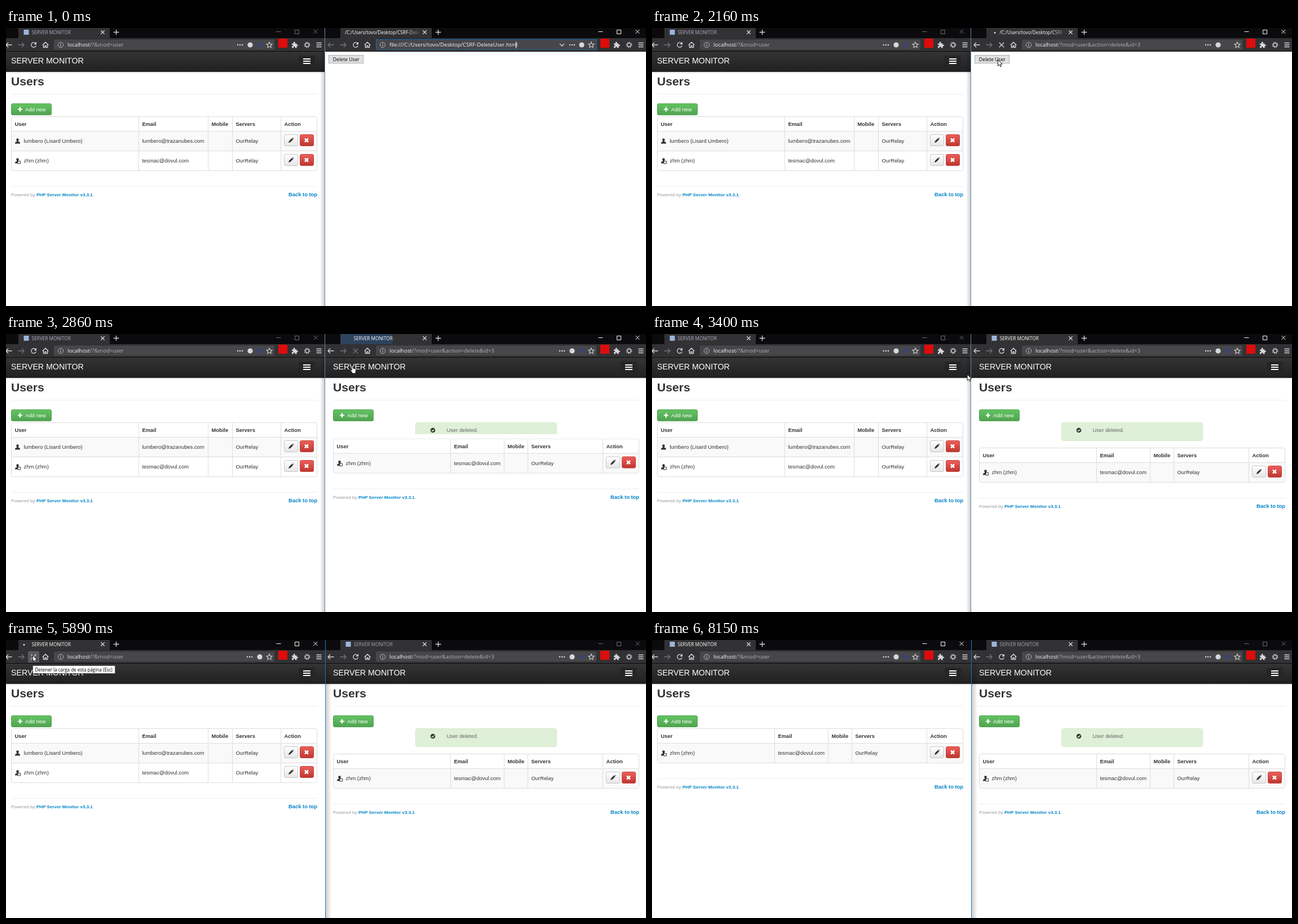
An HTML page that plays this animation: 1135x494 px, repeating every 8700 ms.

```html
<!DOCTYPE html>
<html lang="en">
<head>
<meta charset="utf-8">
<title>Server monitor demo</title>
<style>
html, body { margin: 0; width: 100%; height: 100%; overflow: hidden; background: #fff; }
svg { display: block; width: 1135px; height: 494px; }
text { font: 9.4px "Liberation Sans", Arial, sans-serif; fill: #333; white-space: pre; }
text.b { font-weight: bold; }
text.h { font-size: 21.1px; font-weight: bold; }
text.brand { font-size: 14.2px; fill: #fff; }
text.small { font-size: 8.04px; fill: #999; }
text.link { font-weight: bold; fill: #0084c8; }
text.white { fill: #fff; }
text.url { font: 9.5px "Open Sans", "Noto Sans", sans-serif; fill: #f9f9fa; }
text.tab { font: 8.25px "Open Sans", "Noto Sans", sans-serif; fill: currentColor; }
text.btn { font: 8.6px "Open Sans", "Noto Sans", sans-serif; fill: #000; text-anchor: middle; }
text.tip { font: 8.05px "Open Sans", "Noto Sans", sans-serif; fill: #000; }
tspan.dim { fill: #b1b1b3; }
.ln { fill: none; stroke: currentColor; stroke-width: 1.3; }
.fl { fill: currentColor; }
.t { animation: 8.7s step-end infinite; }
.move { animation: 8.7s linear infinite; }
.burst { transform-box: fill-box; transform-origin: 0 0; }
.dot { animation: wait .87s -.2s ease-in-out infinite; }
@keyframes wait { 50% { transform: translateX(8px); } }
</style>
</head>
<body>
<svg id="stage" viewBox="0 0 1135 494"></svg>
<script>
const LOOP = 8700, RIGHT = 571;
let css = '', count = 0;

const pct = ms => (ms / LOOP * 100).toFixed(3) + '%';
const keys = (name, steps) =>
  css += `@keyframes ${name}{${steps.map(([ms, rule]) => `${pct(ms)}{${rule}}`).join('')}}\n`;

// Shows the markup between pairs of times: on, off, on, off ...
function on(times, markup) {
  const name = 'on' + count++;
  keys(name, [[0, 'opacity:0'], ...times.map((ms, i) => [ms, `opacity:${1 - i % 2}`])]);
  return `<g class="t" style="animation-name:${name}">${markup}</g>`;
}
const after = (ms, markup) => on([ms, LOOP], markup);
const until = (ms, markup) => on([0, ms], markup);

const at = (x, y, markup, color = '#d7d7db') =>
  `<g transform="translate(${x} ${y})" color="${color}">${markup}</g>`;
const text = (x, y, s, cls = '') => `<text x="${x}" y="${y}" class="${cls}">${s}</text>`;
const rect = (x, y, w, h, fill, more = '') =>
  `<rect x="${x}" y="${y}" width="${w}" height="${h}" fill="${fill}" ${more}/>`;
const line = (d, more = '') => `<path class="ln" d="${d}" ${more}/>`;
const solid = (d, more = '') => `<path class="fl" d="${d}" ${more}/>`;
const disc = (x, y, r) => `<circle class="fl" cx="${x}" cy="${y}" r="${r}"/>`;
const grad = (id, a, b, dir = 'x2="0" y2="1"') =>
  `<linearGradient id="${id}" ${dir}><stop stop-color="${a}"/><stop offset="1" stop-color="${b}"/></linearGradient>`;

const person = '<circle class="fl" cy="-2.4" r="2.3"/>' + solid('M-4.5 4.5V3Q-4 1.4-1.4.8V-1H1.4V.8Q4 1.4 4.5 3V4.5Z');
const icon = {
  back: line('M5.5 0H-5M-1-4.2L-5 0L-1 4.2'),
  fwd: line('M-5.5 0H5M1-4.2L5 0L1 4.2'),
  reload: line('M3.3-2.9A4.3 4.3 0 1 0 4.2 1.2') + solid('M5-5.4V-.8H.4Z'),
  stop: line('M-4.3-4.3L4.3 4.3M4.3-4.3L-4.3 4.3'),
  home: line('M-5.3.3L0-4.8L5.3.3M-3.6-.8V4.5H-1V1.5H1V4.5H3.6V-.8'),
  info: '<circle class="ln" r="4.6" style="stroke-width:1"/>' + solid('M-.6-.7H.6V2.6H-.6ZM-.6-2.7H.6V-1.5H-.6Z'),
  dots: disc(-4, 0, 1.25) + disc(0, 0, 1.25) + disc(4, 0, 1.25),
  ball: disc(0, 0, 4.6),
  chevron: line('M-4-2L0 2L4-2'),
  star: line('M0-5L1.5-1.8L5-1.4L2.4 1L3.1 4.5L0 2.8L-3.1 4.5L-2.4 1L-5-1.4L-1.5-1.8Z', 'style="stroke-width:1.1"'),
  puzzle: solid('M-5-2.5H-2Q-3-5.5-.8-5.5T.5-2.5H3.6V0Q6 -1 6 1T3.6 2V5.5H.8Q1 3-.8 3T-2.2 5.5H-5V2Q-2.8 2.5-2.8 1T-5 .2Z'),
  gear: '<circle class="ln" r="3.1"/><circle class="ln" r="4.7" stroke-dasharray="1.8 1.89"/>',
  menu: line('M-4.5-3.5H4.5M-4.5 0H4.5M-4.5 3.5H4.5'),
  plus: line('M-4.8 0H4.8M0-4.8V4.8'),
  pencil: solid('M-4.5 4.5L-3.6 1.4L1.6-3.8L3.8-1.6L-1.4 3.6ZM2.3-4.4L3-5L5-3L4.4-2.3Z'),
  cross: line('M-3-3L3 3M3-3L-3 3', 'style="stroke-width:2.5"'),
  check: disc(0, 0, 4.3) + '<path d="M-2.2 0L-.6 1.7L2.4-1.5" fill="none" stroke="#dff0d8" stroke-width="1.5"/>',
  admin: person,
  guest: person + '<path d="M.5.5H5V5H.5Z" fill="#fff" stroke="#333"/>'
};

// Browser window parts shared by both sides.
const chrome = () =>
  rect(-5, 0, 571, 42, '#0b0b0d') + rect(22, 0, 162, 19, '#323234') + rect(-5, 18, 571, 23, '#323234') +
  rect(85, 20.5, 391, 18, '#474749', 'rx="1"') +
  at(27, 30, icon.fwd, '#737375') + at(70, 30, icon.home) + at(97, 30, icon.info, '#b5b5b8') +
  at(467, 30, icon.star) + rect(483, 19, 16, 16, '#e00b0b') + at(512, 30, icon.puzzle) +
  at(534, 30, icon.gear) + at(555, 30, icon.menu) +
  at(171.5, 7.5, line('M-3.2-3.2L3.2 3.2M3.2-3.2L-3.2 3.2')) + at(195.5, 7.5, icon.plus);

const controls = line('M479.5 6.5H487.5M512.5 3.5H519.5V10.5H512.5ZM545.5 3L552.5 10M552.5 3L545.5 10', 'style="stroke-width:1"');
const favicon = rect(31.5, 3, 9, 9, '#9db4dc');
const siteTitle = text(45.5, 11, 'SERVER MONITOR', 'tab');
const dot = '<circle class="dot" cx="32" cy="8.5" r="1.5" fill="#ddd"/>';
const pageIcons = at(415, 30, icon.dots) + at(433, 30, icon.ball);
const siteMark = at(450, 30, icon.ball, '#3d4273');
const localUrl = rest => text(109, 33.4, `localhost<tspan class="dim">${rest}</tspan>`, 'url');

function burst(start) {
  const name = 'burst' + start;
  keys(name, [[0, 'transform:scaleX(0);opacity:0'], [start, 'transform:scaleX(.06);opacity:0'],
    [start + 1, 'transform:scaleX(.06);opacity:.85'], [start + 375, 'transform:scaleX(1);opacity:0'],
    [LOOP, 'transform:scaleX(0);opacity:0']]);
  return `<g class="move burst" style="animation-name:${name}">${rect(22, 0, 162, 18, '#285f9f')}</g>`;
}

// Text colour that follows the focused window.
function focus(name, first, then, markup) {
  keys(name, [[0, `color:${first}`], [4890, `color:${then}`]]);
  return `<g class="t" style="animation-name:${name}">${markup}</g>`;
}

const button = (x, y, w, fill, edge) => rect(x + .5, y + .5, w - 1, 20, `url(#${fill})`, `rx="2.5" stroke="${edge}"`);

const header = () =>
  rect(-5, 42, 571, 452, '#fff') + rect(-5, 78, 571, 3, 'url(#under)') + rect(-5, 42, 571, 36, 'url(#nav)') +
  text(9, 63, 'SERVER MONITOR', 'brand') + rect(519, 49, 29, 19, '#252525', 'rx="3"') +
  [54, 58, 62].map(y => rect(527, y, 13, 2, '#fff')).join('') +
  text(9, 102, 'Users', 'h') + rect(9, 117, 543, 1, '#eee') +
  button(9, 134, 72, 'green', '#51a351') + at(25, 144.5, line('M-4 0H4M0-4V4', 'style="stroke-width:2.2"'), '#fff') +
  text(34, 148, 'Add new', 'white');

function table(cols, rows) {
  const [email, mobile, servers, action] = cols, n = rows.length, end = 183 + 35 * n, hr = 211 + 35 * n;
  const heads = [[15.5, 'User'], [email + 6.5, 'Email'], [mobile + 6.5, 'Mobile'], [servers + 6.5, 'Servers'], [action + 6.5, 'Action']];
  return rect(9.5, 157.5, 542, end - 157, '#fff', 'rx="3"') + rect(10, 183, 541, 35, '#f9f9f9') +
    rows.map(([kind, name, mail], i) => {
      const y = 183 + 35 * i;
      return rect(10, y, 541, 1, '#ddd') + at(20.5, y + 18, icon[kind], '#333') +
        text(31.5, y + 21, name) + text(email + 6.5, y + 21, mail) + text(servers + 6.5, y + 21, 'OurRelay') +
        button(493, y + 6, 25, 'plain', '#c8c8c8') + at(505.5, y + 16.5, icon.pencil, '#333') +
        button(521, y + 6, 25, 'red', '#c5443f') + at(533, y + 16.5, icon.cross, '#fff');
    }).join('') +
    cols.map(x => rect(x, 158, 1, end - 158, '#ddd')).join('') +
    rect(9.5, 157.5, 542, end - 157, 'none', 'rx="3" stroke="#ddd"') +
    heads.map(([x, s]) => text(x, 174.4, s, 'b')).join('') +
    rect(9, hr, 543, 1, '#eee') + text(9, hr + 18, 'Powered by', 'small') +
    `<text x="54" y="${hr + 18}" class="small"><tspan fill="#0084c8" font-weight="bold">PHP Server Monitor v3.3.1</tspan>.</text>` +
    text(501, hr + 18, 'Back to top', 'link');
}

const admin = ['admin', 'lumbero (Lisard Umbero)', 'lumbero@trazanubes.com'];
const guest = ['guest', 'zhm (zhm)', 'tesmac@dovul.com'];
const short = () => table([217, 312, 354, 487], [guest]);

function slide(name, from, to, markup) {
  const ease = 'animation-timing-function:cubic-bezier(.364,0,.636,1)';
  keys(name, [[0, from], [2626, `${from};${ease}`], [3026, to], [LOOP, to]]);
  return `<g class="move" style="animation-name:${name}">${markup}</g>`;
}

const leftSide = () =>
  header() + until(6050, table([235, 358, 401, 487], [admin, guest])) + after(6050, short()) +
  chrome() + burst(6050) +
  on([4340, 6730], rect(39, 20, 20, 20, '#5b5b5d', 'rx="2"')) +
  at(5, 30, icon.back) +
  on([0, 4990, 6600, LOOP], at(49, 30, icon.reload)) + on([4990, 6600], at(49, 30, icon.stop)) +
  localUrl('/?&amp;mod=user') +
  on([0, 5050, 6250, LOOP], pageIcons + siteMark) +
  on([5050, 6250], at(432, 30, icon.dots) + at(450, 30, icon.ball)) +
  on([0, 4990, 6400, LOOP], favicon) + on([4990, 6050], dot) +
  focus('leftTitle', '#b5a9c4', '#fff', siteTitle) + focus('leftCtl', '#6f6f72', '#fff', controls);

const deletePage = () =>
  rect(-5, 42, 571, 452, '#fff') +
  on([0, 1300, 1780, LOOP], rect(1.5, 48.5, 61, 14, '#e1e1e1', 'stroke="#adadad"')) +
  on([1300, 1780], rect(1.5, 48.5, 61, 14, '#e5f1fb', 'stroke="#0078d7"')) +
  on([1530, 1620], rect(1.5, 48.5, 61, 14, '#cce4f7', 'stroke="#005499"')) +
  text(32.3, 58.8, 'Delete User', 'btn');

const alertBox = () =>
  rect(155.5, 157.5, 250, 32, '#dff0d8', 'rx="3" stroke="#d6e9c6"') + at(186, 171, icon.check, '#333') +
  `<text x="210.5" y="174.4" style="fill:#666">User deleted.</text>`;

const rightSide = () =>
  until(2480, deletePage()) +
  after(2480, header() +
    slide('push', 'transform:translateY(0)', 'transform:translateY(45px)', short()) +
    slide('open', 'clip-path:inset(0 0 100% 0)', 'clip-path:inset(0 0 0 0)', alertBox())) +
  chrome() + burst(2660) +
  until(2150, at(5, 30, icon.back, '#737375')) + after(2150, at(5, 30, icon.back)) +
  on([0, 1930, 3100, LOOP], at(49, 30, icon.reload)) +
  on([1930, 2480], at(49, 30, icon.stop)) + on([2480, 3100], at(49, 30, icon.stop, '#77777a')) +
  until(1780, rect(85.5, 20.5, 391, 18, 'none', 'stroke="#176aa8"') +
    at(415, 30, icon.chevron) + at(433, 30, icon.dots) + at(450, 30, icon.ball)) +
  after(1780, pageIcons) + after(2480, siteMark) +
  until(2150, text(109, 33.4, 'file:///C:/Users/tovo/Desktop/CSRF-DeleteUser.html', 'url')) +
  after(2150, localUrl('/?mod=user&amp;action=delete&amp;id=3')) +
  on([0, 70, 580, 1070], rect(333, 24, 1, 12, '#fff')) +
  focus('rightTitle', '#fff', '#a5a5aa',
    until(1780, text(30, 11, '/C:/Users/tovo/Desktop/CSRF-Dele', 'tab')) +
    on([1780, 2480], text(45.5, 11, '/C:/Users/tovo/Desktop/CSRF', 'tab')) +
    until(2480, rect(140, 1, 24, 16, 'url(#fade)')) + after(2480, siteTitle)) +
  on([1780, 2600], dot) + after(3000, favicon) +
  focus('rightCtl', '#fff', '#6f6f72', controls);

const arrow = '<path d="M.5.5V11.2L3 8.9L4.8 12.8L6.6 12L4.9 8.2H8.2Z" fill="#fff" stroke="#000" stroke-width=".9"/>';
const hand = '<path d="M-1.2 1Q0-.6 1.2 1V5L5 6Q6.4 6.4 6.2 8L5.4 12V14H-.6V12.5L-4 8Q-3.5 6.5-1.2 8.4Z" fill="#fff" stroke="#000" stroke-width=".8"/>';

const stops = [
  [0, 1010, 520], [229, 1010, 520], [230, 1010, 461], [650, 850, 270], [1070, 628, 67], [1300, 613, 56],
  [3250, 613, 56], [3400, 560, 71], [3460, 480, 90], [3550, 366, 108], [3710, 366, 108], [4000, 225, 73],
  [4340, 47, 27], [6670, 47, 27], [7100, 480, 235], [7530, 977, 457], [8150, 1062, 497], [LOOP, 1062, 520]
];
keys('cursor', stops.map(([ms, x, y]) => [ms, `transform:translate(${x}px,${y}px)`]));

document.getElementById('stage').innerHTML =
  '<defs>' + grad('nav', '#343434', '#202020') + grad('under', '#0002', '#0000') +
  grad('green', '#62c462', '#51a351') + grad('plain', '#fff', '#e6e6e6') + grad('red', '#ee5f5b', '#bd362f') +
  grad('fade', '#32323400', '#323234', '') + grad('shadeL', '#0000', '#0003', '') + grad('shadeR', '#0003', '#0000', '') +
  '</defs>' +
  at(RIGHT, 0, rightSide()) +
  `<svg width="566" height="494">${leftSide()}</svg>` +
  until(4890, rect(557, 42, 8, 452, 'url(#shadeL)') + rect(565, 0, 1, 494, '#5f8dab')) +
  after(4890, rect(567, 42, 10, 452, 'url(#shadeR)') + rect(566, 0, 1, 494, '#1f7ac0')) +
  on([5450, 6150], rect(47.5, 45.5, 146, 14, '#fff', 'stroke="#555"') +
    text(51.5, 56, 'Detener la carga de esta página (Esc)', 'tip')) +
  '<g class="move" style="animation-name:cursor">' +
  on([0, 2480, 3280, LOOP], arrow) + on([2480, 3280], at(1.5, 0, hand)) + '</g>';

const sheet = document.createElement('style');
sheet.textContent = css;
document.head.append(sheet);
</script>
</body>
</html>
```
